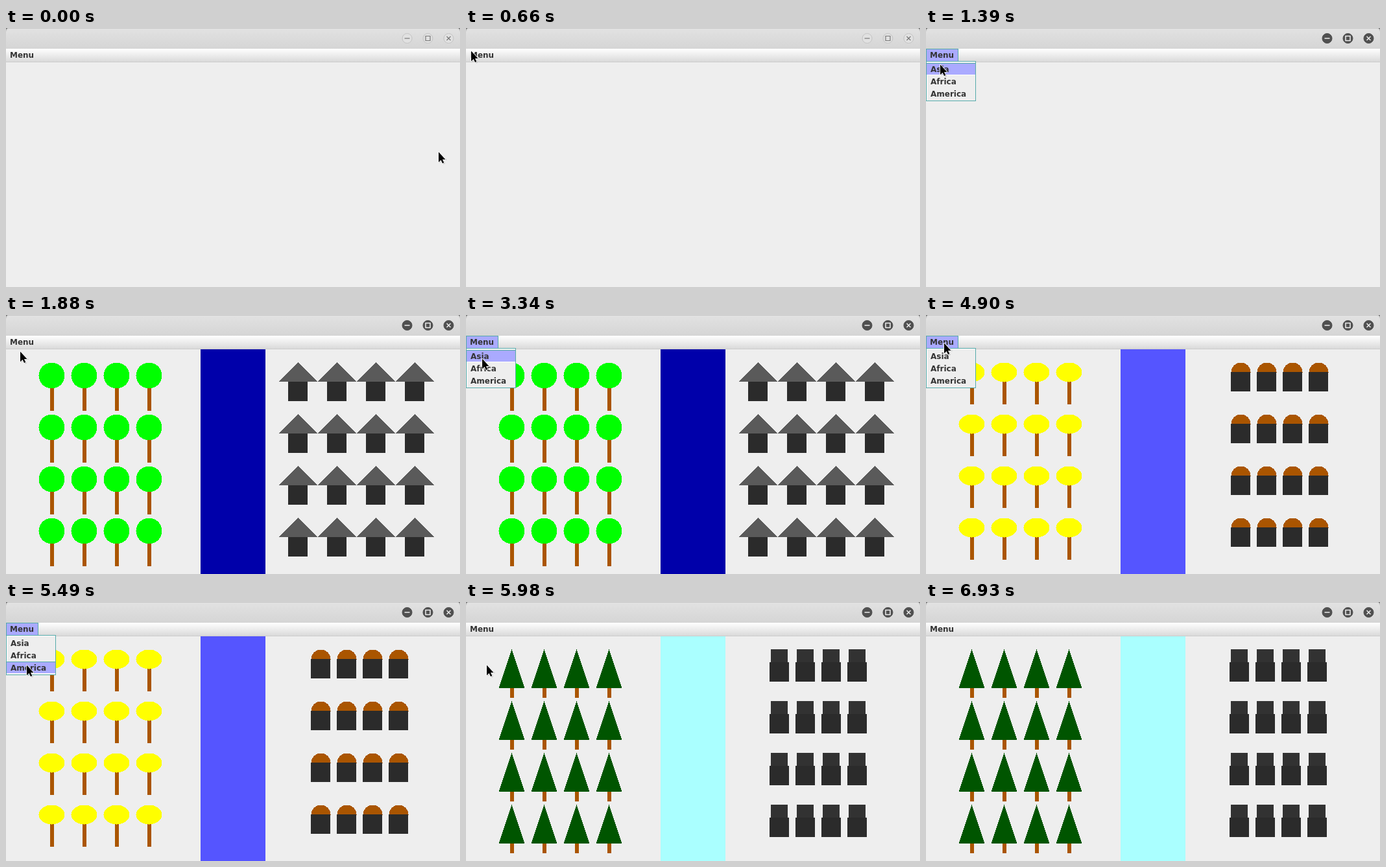
Recreate the animation shown at these times as an HTML page. Size 700 by 400 pixels, loop 8.8 s.

```html
<!DOCTYPE html>
<html lang="en">
<head>
<meta charset="utf-8">
<title>Menu landscapes</title>
<style>
  html, body { margin: 0; width: 100%; height: 100%; overflow: hidden; background: #eee; }
  svg { display: block; width: 700px; height: 400px; }
  text { font: bold 12px "DejaVu Sans", sans-serif; fill: #333; }
  .crisp { shape-rendering: crispEdges; }
  .button circle { fill: #e1e1e1; stroke: #c3c3c3; }
  .button path { fill: none; stroke: #777; stroke-width: 1.2; }
  .focused .button circle { fill: #505050; stroke: #4a4a4a; }
  .focused .button path { stroke: #eee; stroke-width: 1.5; }
</style>
</head>
<body>
<svg id="stage" viewBox="0 0 700 400">
  <defs>
    <linearGradient id="titleFill" x2="0" y2="1">
      <stop stop-color="#e2e2e2"/><stop offset="1" stop-color="#d5d5d5"/>
    </linearGradient>
    <linearGradient id="barFill" x2="0" y2="1">
      <stop stop-color="#fff"/><stop offset="1" stop-color="#dadada"/>
    </linearGradient>
  </defs>

  <rect width="700" height="400" fill="#eee"/>
  <g id="scenes" class="crisp"></g>

  <rect width="700" height="10" fill="#777"/>
  <path d="M0 32V5Q0 0 5 0H695Q700 0 700 5V32Z" fill="url(#titleFill)"/>
  <path d="M.5 5Q.5 .5 5 .5H695Q699.5 .5 699.5 5" fill="none" stroke="#c8c8c8"/>
  <g class="button" transform="translate(618.5 16)"><circle r="7.5"/><path d="M-4 0H4"/></g>
  <g class="button" transform="translate(650.5 16)"><circle r="7.5"/><path d="M-3.5 -3.5H3.5V3.5H-3.5Z"/></g>
  <g class="button" transform="translate(682.5 16)"><circle r="7.5"/><path d="M-3 -3L3 3M3 -3L-3 3"/></g>

  <g class="crisp">
    <rect y="32" width="700" height="20" fill="url(#barFill)"/>
    <rect y="52" width="700" height="1" fill="#ccc"/>
  </g>
  <g id="popup" class="crisp">
    <path d="M0 32H50V52H0Z" fill="#aaf"/>
    <path d="M.5 52V32.5H49.5V52" fill="none" stroke="#5aa"/>
    <rect x=".5" y="51.5" width="76" height="61" fill="#eee" stroke="#5aa"/>
    <path d="M1 52.5H76M1.5 53V112" stroke="#fff"/>
    <g id="armed">
      <rect x="1" width="75" height="19" fill="#aaf"/>
      <path d="M1 .5H76" stroke="#5aa"/>
      <path d="M1 18.5H76" stroke="#fff"/>
    </g>
    <text x="7" y="68">Asia</text>
    <text x="7" y="87">Africa</text>
    <text x="7" y="106">America</text>
  </g>
  <text x="6" y="46">Menu</text>

  <g id="cursor">
    <path d="M1.5 2V17.5L5 14.5L7.5 19.5L10 18.5L8 13H13Z" fill="#000" opacity=".18"/>
    <path d="M0 .5V16.2L3.6 12.9L6 18L8.3 17L6 12H10.5Z" fill="#000" stroke="#fff" stroke-width="1.6"
      stroke-linejoin="round" paint-order="stroke"/>
  </g>
</svg>
<script>
const LOOP = 8800;
const FOCUS_AT = 1010;
const OPEN_TIMES = [[1010, 1880], [2690, 4020], [4900, 5980]];
const SCENE_TIMES = [1880, 4090, 5980];
const ITEM_TOP = 54, ITEM_HEIGHT = 19;
const START = [667, 191];

const smooth = p => p * p * (3 - 2 * p);
const accelerate = p => p * p;

// first step, last step, step count, destination, easing
const MOVES = [
  [40, 612, 14, 1, 32, smooth],
  [656, 700, 2, 14, 38, smooth],
  [1064, 1390, 7, 22, 56, smooth],
  [2060, 2100, 2, 23, 56, smooth],
  [2280, 2480, 6, 22, 45, smooth],
  [3000, 3340, 8, 25, 67, smooth],
  [3390, 3580, 5, 32, 79, smooth],
  [4260, 4300, 2, 32, 84, smooth],
  [4470, 4750, 8, 28, 43, smooth],
  [4955, 5490, 11, 32, 97, smooth],
  [6310, 6510, 6, 402, -40, accelerate],
];

const rect = (x, y, w, h, fill) => `<rect x="${x}" y="${y}" width="${w}" height="${h}" fill="${fill}"/>`;
const oval = (cx, cy, rx, ry, fill) => `<ellipse cx="${cx}" cy="${cy}" rx="${rx}" ry="${ry}" fill="${fill}"/>`;
const triangle = (x, y, w, h, fill) =>
  `<path d="M${x} ${y + h}h${w}l${-w / 2} ${-h}z" fill="${fill}"/>`;
const trunk = (y, h) => rect(68, y, 6, h, '#a50');

const LANDSCAPES = [
  {
    river: '#00a', spacing: 60,
    tree: trunk(113, 35) + oval(70.5, 93.5, 20, 20, '#0f0'),
    house: triangle(420, 73, 60, 30, '#5a5a5a') + rect(435, 103, 30, 30, '#2b2b2b'),
  },
  {
    river: '#55f', spacing: 40,
    tree: trunk(103, 35) + oval(70.5, 88.5, 20, 15, '#ff0'),
    house: oval(485.5, 88.5, 15, 15, '#a50') + rect(470, 88, 30, 30, '#2b2b2b'),
  },
  {
    river: '#aff', spacing: 40,
    tree: trunk(133, 15) + triangle(50.5, 73, 40, 60, '#050'),
    house: rect(470, 73, 26, 20, '#323232') + rect(468, 93, 30, 30, '#2b2b2b'),
  },
];

function grid(shape, spacing) {
  let out = '';
  for (let row = 0; row < 4; row++)
    for (let col = 0; col < 4; col++)
      out += `<g transform="translate(${col * spacing} ${row * 80})">${shape}</g>`;
  return out;
}

const $ = id => document.getElementById(id);
$('scenes').innerHTML = LANDSCAPES.map(({ river, spacing, tree, house }) =>
  `<g>${rect(300, 53, 100, 347, river)}${grid(tree, 50)}${grid(house, spacing)}</g>`).join('');
const scenes = [...$('scenes').children];

function cursorAt(t) {
  let [x, y] = START;
  for (const [first, last, steps, toX, toY, ease] of MOVES) {
    if (t < first) break;
    const interval = (last - first) / (steps - 1);
    const step = Math.min(steps, Math.floor((t - first) / interval + 1e-6) + 1);
    const p = ease(step / steps);
    x += (toX - x) * p;
    y += (toY - y) * p;
  }
  return [Math.round(x), Math.round(y)];
}

const show = (node, visible) => node.setAttribute('visibility', visible ? 'inherit' : 'hidden');

function render(t) {
  const [x, y] = cursorAt(t);
  const item = Math.floor((y - ITEM_TOP) / ITEM_HEIGHT);
  const open = OPEN_TIMES.some(([from, to]) => t >= from && t < to);
  const current = SCENE_TIMES.filter(at => t >= at).length - 1;

  $('stage').classList.toggle('focused', t >= FOCUS_AT);
  scenes.forEach((scene, i) => show(scene, i === current));
  show($('popup'), open);
  $('popup').style.display = open ? '' : 'none';
  show($('armed'), item >= 0 && item < 3);
  $('armed').setAttribute('transform', `translate(0 ${ITEM_TOP + item * ITEM_HEIGHT})`);
  $('cursor').setAttribute('transform', `translate(${x} ${y})`);
}

const began = performance.now();
function tick() {
  render((performance.now() - began) % LOOP);
  requestAnimationFrame(tick);
}
tick();
</script>
</body>
</html>
```
